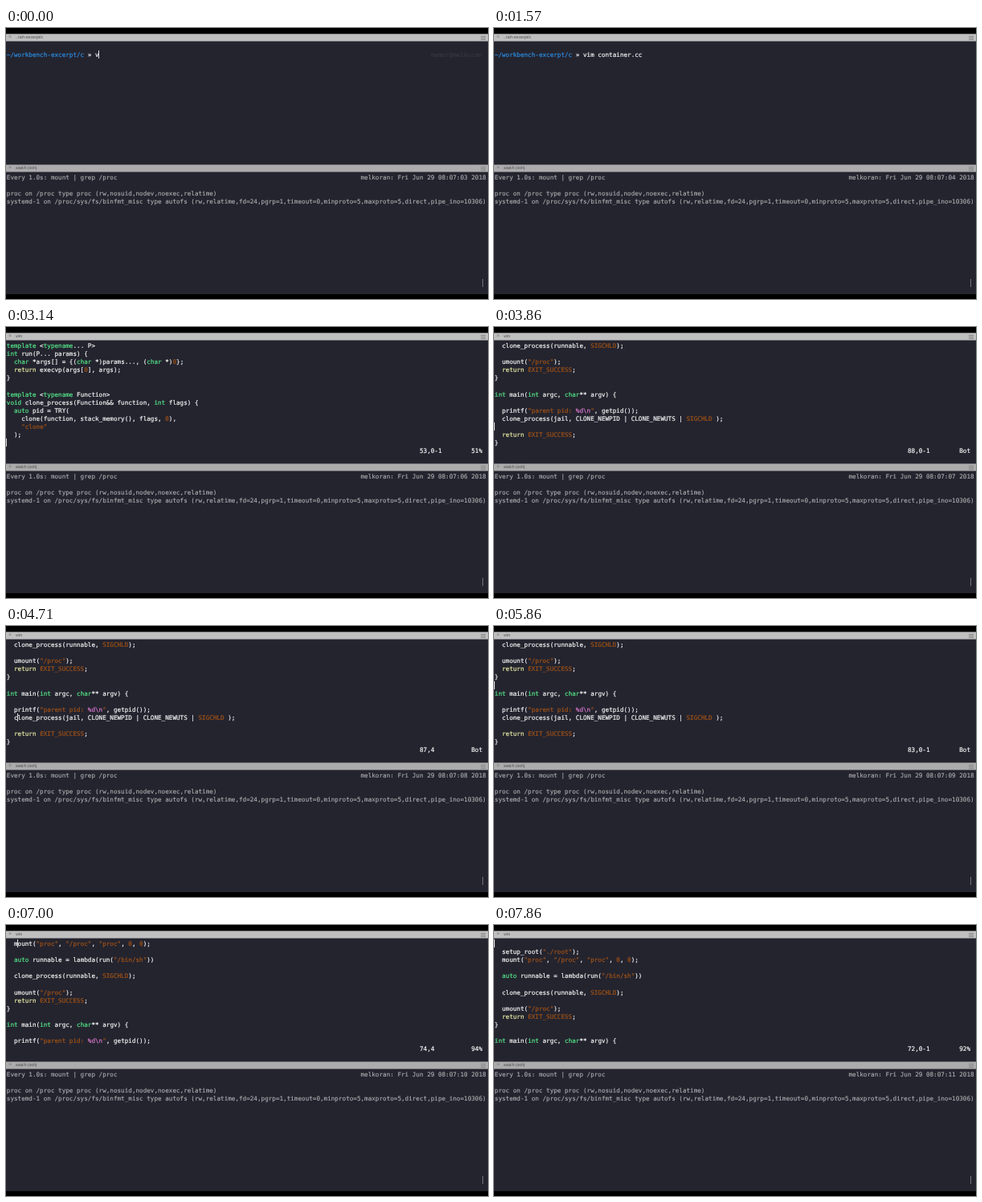
An HTML page for the animation above (8 s loop, 600x338 px).

```html
<!DOCTYPE html>
<html lang="en">
<head>
<meta charset="utf-8">
<title>Terminal</title>
<style>
html, body { margin: 0; width: 100%; height: 100%; overflow: hidden; background: #000; }
#stage { position: relative; width: 600px; height: 338px; overflow: hidden; text-rendering: geometricPrecision; }
#stage * { position: absolute; margin: 0; }
.pane { left: 0; width: 600px; background: #24242f; }
.bar { left: 0; width: 600px; height: 8px; background: #c0bfc0; color: #484848;
  border: solid #78777c; border-width: 1px 0;
  font: 5.2px/8px "Liberation Sans", Arial, sans-serif; }
.bar + .pane + .bar { background: #adacad; border-color: #6c6b70; }
.bar span { left: 12px; white-space: pre; }
.bar i { left: 3px; font: 7px/7.6px "Liberation Sans", sans-serif; color: #777; }
.bar u { left: 591px; top: 2px; width: 6px; height: 1px; background: #888; box-shadow: 0 2px #888, 0 4px #888; }
pre { left: .8px; top: 1.8px; font: 7.645px/10.12px "DejaVu Sans Mono", monospace; color: #f4f4f4;
  -webkit-text-stroke: .2px; }
#stage pre b { position: static; font-weight: normal; }
#watch { color: #b0b0b2; -webkit-text-stroke-width: .1px; }
.cursor { width: 1px; height: 10px; background: #d8d8da; }
.pink { color: #d878cc; }
.orange { color: #a05216; }
.green { color: #54e688; }
.yellow { color: #e8e8a4; }
.blue { color: #2c8ce0; }
.faint { color: #38373d; }
</style>
</head>
<body>
<div id="stage">
  <div class="bar" style="top:7px"><i>×</i><span id="title"></span><u></u></div>
  <div class="pane" style="top:17px;height:153px">
    <pre id="shell"></pre>
    <div class="cursor" id="cursor"></div>
  </div>
  <div class="bar" style="top:170px"><i>×</i><span>watch (ssh)</span><u></u></div>
  <div class="pane" style="top:180px;height:152px">
    <pre id="watch"></pre>
    <div class="cursor" style="left:593px;top:133px;background:#74747b"></div>
  </div>
</div>
<script>
const code = String.raw`#include <iostream>
#include <sched.h>
#include <sys/types.h>
#include <unistd.h>
#include <sys/wait.h>
#include <sys/mount.h>

int TRY(int status, const char *msg) {
 if(status == -1) {
    perror(msg);
    exit(EXIT_FAILURE);
 }
 return status;
}

void setup_variables() {
  clearenv();
  setenv("TERM", "xterm-256color", 0);
  setenv("PATH", "/bin/:/sbin/:/usr/bin/", 0);
}

void setup_root(const char* folder) {
  chroot(folder);
  chdir("/");
}

char* stack_memory() {
  const int stackSize = 65536;
  auto *stack = new (std::nothrow) char[stackSize];

  if (stack == nullptr) {
    printf("Cannot allocate memory\n");
    exit(EXIT_FAILURE);
  }

  return stack+stackSize;
}

#define lambda(fn) [](void *args) -> int { return fn; };

template <typename... P>
int run(P... params) {
  char *args[] = {(char *)params..., (char *)0};
  return execvp(args[0], args);
}

template <typename Function>
void clone_process(Function&& function, int flags) {
  auto pid = TRY(
    clone(function, stack_memory(), flags, 0),
    "clone"
  );

  wait(nullptr);
}

void set_hostname(const char* name) {
  TRY(
    sethostname(name, strlen(name)),
    "sethostname"
  );
}

int child_status() {
  return 0;
}

int jail(void *args) {

  printf("child pid: %d\n", getpid());
  setup_variables();

  setup_root("./root");
  mount("proc", "/proc", "proc", 0, 0);

  auto runnable = lambda(run("/bin/sh"))

  clone_process(runnable, SIGCHLD);

  umount("/proc");
  return EXIT_SUCCESS;
}

int main(int argc, char** argv) {

  printf("parent pid: %d\n", getpid());
  clone_process(jail, CLONE_NEWPID | CLONE_NEWUTS | SIGCHLD );

  return EXIT_SUCCESS;
}`.split("\n");

const TICK = 1000 / 7, LOOP = 8000, CELL = 4.602, LINE = 10.12, ROWS = 13;
const $ = id => document.getElementById(id);
const paint = (color, text) => `<b class="${color}">${text}</b>`;

const syntax = /("[^"]*"|&lt;[\w.\/]+>$|\b(?:EXIT_\w+|SIGCHLD|nullptr|\d+)\b|-1\b)|(#\w+)|\b(int|const|char|void|auto|template|typename)\b|\b(if|return|new)\b/g;
const highlight = line => line.replace(/&/g, "&amp;").replace(/</g, "&lt;")
  .replace(syntax, (all, constant, directive, type) =>
    constant ? paint("orange", all.replace(/%d|\\n/g, s => paint("pink", s)))
    : paint(directive ? "pink" : type ? "green" : "yellow", all));
const colored = code.map(highlight);

// Value of the last [tick, value] step that has begun.
const at = (steps, n) => steps.filter(([start]) => start <= n).pop()[1];

const typed = [[0, "v"], [2, "vi"], [3, "vim"], [4, "vim c"], [5, "vim co"],
  [7, "vim container"], [9, "vim container.cc"]];
const climb = [[26, 89], [27, 88], [28, 87], [37, 86], [41, 83], [42, 82], [43, 80],
  [44, 79], [46, 77], [47, 76], [48, 75], [49, 74], [51, 73], [55, 72]];

function placeCursor(column, row) {
  $("cursor").style.left = .4 + column * CELL + "px";
  $("cursor").style.top = 1 + row * LINE + "px";
}

function drawPrompt(n) {
  const command = at(typed, n), entered = n >= 11;
  const gap = " ".repeat(91 - command.length);
  $("title").textContent = "..nch-excerpt/c";
  $("shell").innerHTML = "\n" + paint("blue", "~/workbench-excerpt/c") + " » " + command +
    (entered ? "" : gap + paint("faint", "nemor@melkoran"));
  placeCursor(24 + command.length, 1);
  $("cursor").hidden = entered;
}

function drawEditor(n) {
  const line = n < 18 ? 1 : n < 26 ? Math.min(90, 1 + 13 * (n - 18)) : at(climb, n);
  const top = n < 26 ? Math.max(1, line - ROWS + 1) : Math.min(78, line);
  const wanted = Math.min(4, Math.max(1, n - 28));
  const column = Math.min(wanted, code[line - 1].length);
  const place = top === 1 ? "Top" : top === 78 ? "Bot" : Math.floor((top - 1) * 100 / 77) + "%";
  const message = n < 19 ? '"container.cc" 90L, 1841C' : "";
  const ruler = n < 18 ? "" : `${line},${column || "0-1"}`.padEnd(14) + place;
  const rows = n < 15 ? Array(ROWS).fill("") : colored.slice(top - 1, top - 1 + ROWS);
  $("title").textContent = "vim";
  $("shell").innerHTML = [...rows, message.padEnd(112) + ruler].join("\n");
  placeCursor(Math.max(0, column - 1), line - top);
  $("cursor").hidden = false;
}

function drawWatch(n) {
  const second = 4 + Math.floor((n * TICK - 628) / 1020);
  const clock = `melkoran: Fri Jun 29 08:07:${String(second).padStart(2, "0")} 2018`;
  $("watch").textContent = "Every 1.0s: mount | grep /proc".padEnd(96) + clock + `

proc on /proc type proc (rw,nosuid,nodev,noexec,relatime)
systemd-1 on /proc/sys/fs/binfmt_misc type autofs (rw,relatime,fd=24,pgrp=1,timeout=0,minproto=5,maxproto=5,direct,pipe_ino=10306)`;
}

let shown = -1;
function frame() {
  const n = Math.min(55, Math.floor((performance.now() % LOOP + 6) / TICK));
  if (n !== shown) {
    shown = n;
    (n < 14 ? drawPrompt : drawEditor)(n);
    drawWatch(n);
  }
  requestAnimationFrame(frame);
}
frame();
</script>
</body>
</html>
```
